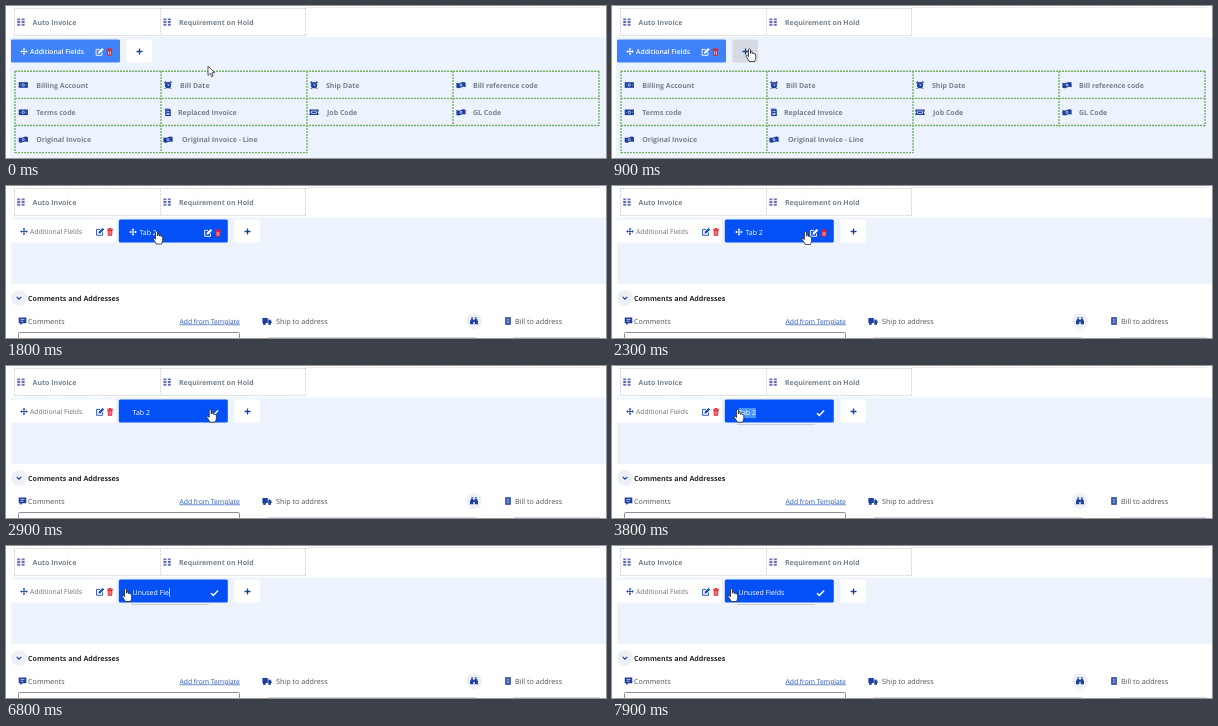
These frames come from a looping animation (600x152 px, 8 s). An HTML page:

```html
<!DOCTYPE html>
<html lang="en">
<head>
<meta charset="utf-8">
<title>Adding and renaming a tab</title>
<style>
  html, body { margin: 0; width: 100%; height: 100%; overflow: hidden; background: #fff; }
  svg { display: block; width: 600px; height: 152px; }
  text { font: 7px "Open Sans", "Noto Sans", sans-serif; white-space: pre; text-rendering: geometricPrecision; }
  .label { font-size: 7px; font-weight: 700; fill: #76818c; }
  .head { font-size: 7.1px; font-weight: 700; fill: #25282d; }
  .plain { font-size: 7.2px; fill: #4b5058; }
  .link { font-size: 6.75px; fill: #2457b5; text-decoration: underline; }
  .tab { fill: #fff; }
  .active { font-size: 6.75px; font-weight: 600; fill: #fff; }
  .idle { font-size: 6.8px; fill: #6b6f78; }
</style>
</head>
<body>
<svg id="stage" viewBox="0 0 600 152"></svg>
<script>
const NS = "http://www.w3.org/2000/svg";
const LOOP = 8000, STEP = 100;
const NAVY = "#1d3f9f", RED = "#e2222f", PANEL = "#edf3fd";
const stage = document.getElementById("stage");

function add(parent, tag, attrs = {}, content) {
  const el = document.createElementNS(NS, tag);
  for (const key in attrs) el.setAttribute(key, attrs[key]);
  if (content !== undefined) el.textContent = content;
  parent.appendChild(el);
  return el;
}
const group = (parent) => add(parent, "g");
const rect = (parent, x, y, width, height, fill, rx = 0) =>
  add(parent, "rect", { x, y, width, height, fill, rx });
const label = (parent, x, y, str, cls) => add(parent, "text", { x, y, class: cls }, str);
const line = (parent, d, stroke, dash = "none", width = 1) =>
  add(parent, "path", { d, stroke, fill: "none", "stroke-width": width, "stroke-dasharray": dash });
const show = (el, on) => el.setAttribute("visibility", on ? "inherit" : "hidden");
const place = (el, [x, y]) => el.setAttribute("transform", `translate(${x} ${y})`);

// Each icon is centred on 0,0: solid shape, strokes, pale details on top
const ICONS = {
  move: ["M0-3.8L1.4-2.1H-1.4ZM0 3.8L1.4 2.1H-1.4ZM-3.8 0L-2.1-1.4V1.4ZM3.8 0L2.1-1.4V1.4Z", "M-2.5 0H2.5M0-2.5V2.5"],
  edit: ["M-1.5 1.8L-1.1-.4 2.6-4 4.2-2.4.6 1.3Z", "M0-2.6H-3.4V3.3H2.5V.6"],
  trash: ["M-2.5-1.9H2.5L2.1 3.7H-2.1Z", "M-3-2.7H3M-1-3.5H1", "M-.9-.9V2.7M.9-.9V2.7"],
  list: ["M-3.6-3.6H-.6V-1.7H-3.6ZM.8-3.6H3.8V-1.7H.8ZM-3.6-.9H-.6V1H-3.6ZM.8-.9H3.8V1H.8ZM-3.6 1.8H-.6V3.7H-3.6ZM.8 1.8H3.8V3.7H.8Z"],
  bill: ["M-4.6-2.8H4.6V2.8H-4.6Z", "", "M0-1.2A1.2 1.2 0 0 1 0 1.2A1.2 1.2 0 0 1 0-1.2M-3.4 0H-2.8M2.8 0H3.4"],
  wave: ["M-4.6-2.2Q-2.2-1.2 0-2.4T4.6-2.6V2.3Q2.2 1.3 0 2.5T-4.6 2.7Z", "", "M0-1A1 1 0 0 1 0 1.1A1 1 0 0 1 0-1"],
  clock: ["M0-2.9A3.1 3.1 0 0 1 0 3.3A3.1 3.1 0 0 1 0-2.9", "M-3.6-2L-2-3.5M3.6-2L2-3.5M-2.4 2.8L-3.1 3.6M2.4 2.8L3.1 3.6", "M0-1.5V.4H1.4"],
  invoice: ["M-2.8-2.7H2.8V3.8H-2.8Z", "M-3.3-3.1H2.3", "M-1.5-.9H1.5M-1.2 1H1.2V2.2H-1.2Z"],
  ticket: ["M-4.6-2.8H4.6V-.9A.9.9 0 0 0 4.6.9V2.8H-4.6V.9A.9.9 0 0 0-4.6-.9Z", "", "M-2.5-1.2H2.5V1.2H-2.5Z"],
  plus: ["", "M-3 0H3M0-3V3"],
  check: ["", "M-3.5.2L-1.2 2.5 3.6-2.5"],
  chevron: ["", "M-2.3-1.2L0 1.2 2.3-1.2"],
  chat: ["M-3.8-3.4H3.8V2.2H0L-2.2 4V2.2H-3.8Z", "", "M-2-1.6H2M-2 .3H1"],
  truck: ["M-4.6-3H.8V2H-4.6ZM1.3-1.6H3L4.6.2V2H1.3ZM-2.6 1A1.5 1.5 0 0 1-2.6 4A1.5 1.5 0 0 1-2.6 1M2.6 1A1.5 1.5 0 0 1 2.6 4A1.5 1.5 0 0 1 2.6 1", "", "M-2.6 2.4V2.6M2.6 2.4V2.6"],
  binoculars: ["M-2.8-2.4H-.7V3.2H-4V.6ZM2.8-2.4H.7V3.2H4V.6ZM-2.7-3.7H-.9V-2.9H-2.7ZM.9-3.7H2.7V-2.9H.9ZM-.8-1H.8V1H-.8Z"],
  doc: ["M-2.8-3.8H2.8V3.8H-2.8Z", "", "M-1.5-1.8H1.5M-1.5 0H1.5M-1.5 1.8H1.5"],
};
function icon(parent, name, x, y, color, width = 1.1) {
  const [solid, strokes, detail] = ICONS[name];
  const g = group(parent);
  place(g, [x, y]);
  if (solid) add(g, "path", { d: solid, fill: color });
  if (strokes) line(g, strokes, color, "none", width);
  if (detail) line(g, detail, "#e9effb", "none", 0.7);
  return g;
}

function tabFrame(parent, x, width, fill) {
  return rect(parent, x, 33.4, width, 23, fill, 1.5);
}

function drawTop() {
  const g = group(stage);
  line(g, "M8 2.5H300M8 29.5H300M8.5 2V29M154.5 2V29M299.5 2V29", "#d0d3d6", "1.5 1");
  line(g, "M300 1.5H594", "#dfe1e4", "1.5 1");
  icon(g, "list", 14.8, 16, "#6672b4");
  label(g, 26.6, 18.5, "Auto Invoice", "label");
  icon(g, "list", 161, 16, "#6672b4");
  label(g, 173, 18.5, "Requirement on Hold", "label");
}

function drawFields() {
  const g = group(stage);
  rect(g, 4, 31, 596, 121, PANEL);
  tabFrame(g, 5, 109, "#3f82f7");
  icon(g, "move", 18, 45.5, "#fff", 0.9);
  label(g, 24, 48, "Additional Fields", "active");
  icon(g, "edit", 93.5, 46, "#fff", 0.9);
  icon(g, "trash", 103.5, 46, RED);
  const button = tabFrame(g, 120.5, 25.5, "#fff");
  icon(g, "plus", 133.5, 45.5, NAVY, 1.3);

  line(g, "M9 65.3H593M9 92.4H593M9 119.5H593M9 146.6H301M9 65V147M155 65V147M301 65V147M447 65V120M593 65V120",
    "#74b163", "2 1", 1.4);
  const rows = [
    [["bill", "Billing Account", 30.2], ["clock", "Bill Date", 174], ["clock", "Ship Date", 320], ["wave", "Bill reference code", 467]],
    [["bill", "Terms code", 30.2], ["invoice", "Replaced Invoice", 172], ["ticket", "Job Code", 321], ["wave", "GL Code", 467]],
    [["wave", "Original Invoice", 30.2], ["wave", "Original Invoice - Line", 176]],
  ];
  rows.forEach((cells, r) => cells.forEach(([name, str, x], c) => {
    const y = 79 + r * 27.3;
    icon(g, name, [17.3, 162, 308, 455][c], y, NAVY);
    label(g, x, y + 2.7, str, "label");
  }));
  return { g, button };
}

function drawForm() {
  const g = group(stage);
  rect(g, 5, 31.5, 595, 66.5, PANEL);
  tabFrame(g, 5, 105, "#fff");
  icon(g, "move", 18, 45.5, NAVY, 0.9);
  label(g, 24, 48, "Additional Fields", "idle");
  icon(g, "edit", 94, 46, "#1b48c4", 0.9);
  icon(g, "trash", 104, 46, RED);
  tabFrame(g, 228.5, 25.5, "#fff");
  icon(g, "plus", 241.5, 45.5, NAVY, 1.3);

  add(g, "circle", { cx: 13, cy: 112, r: 8, fill: "#edf0f7" });
  icon(g, "chevron", 13, 112, NAVY);
  label(g, 22, 115, "Comments and Addresses", "head");
  icon(g, "chat", 16.5, 135, NAVY);
  label(g, 22, 137.7, "Comments", "plain");
  label(g, 173.5, 137.5, "Add from Template", "link");
  icon(g, "truck", 261, 135, NAVY);
  label(g, 270, 137.7, "Ship to address", "plain");
  add(g, "circle", { cx: 468, cy: 135, r: 8, fill: "#edf0f7" });
  icon(g, "binoculars", 468, 135, NAVY);
  icon(g, "doc", 502, 135, NAVY);
  label(g, 509, 137.7, "Bill to address", "plain");
  add(g, "rect", { x: 12.5, y: 146.5, width: 221, height: 12, rx: 1, fill: "#fff", stroke: "#8d9095" });
  line(g, "M262 151.5H470M508 151.5H594", "#d3d6da");

  const underline = rect(g, 125, 58, 78, 1, "#c9d0dc");
  tabFrame(g, 112.8, 109, "#0450f7");
  const view = group(g);
  icon(view, "move", 127, 46, "#fff", 0.9);
  label(view, 133.5, 48.7, "Tab 2", "tab");
  icon(view, "edit", 202, 47, "#fff", 0.9);
  icon(view, "trash", 212, 47, RED);

  const edit = group(g);
  const marked = rect(edit, 126.6, 42, 0, 10, "#4b95ff");
  const input = label(edit, 126.6, 49.2, "Tab 2", "tab");
  const caret = rect(edit, 0, 42, 0.7, 9, "#e6eeff");
  icon(edit, "check", 208.5, 47, "#fff", 1.5);
  return { g, underline, view, edit, marked, input, caret };
}

function drawPointers() {
  const make = (d, fill, stroke, width) => add(stage, "path",
    { d, fill, stroke, "stroke-width": width, "stroke-linejoin": "round" });
  return {
    arrow: make("M0 0V9.4L2.2 7.4 3.7 10.7 5.2 10 3.7 6.8H6.6Z", "#fff", "#333", 0.8),
    hand: make("M-1 1Q0-.5 1 1V4.8Q2-.0 2.8 5Q4 4 4.5 5.4Q6 4.8 6.2 6.4V9.3Q6 11 5 13H-.2Q-1.2 11-3.4 8Q-3.6 6.6-2.3 7L-1 8.2Z",
      "#fff", "#222", 0.8),
    beam: make("M-1.8-4.5H1.8M0-4.5V4.5M-1.8 4.5H1.8", "none", "#dbe6ff", 0.8),
  };
}

// time, x, y of the pointer tip
const PATH = [
  [0, 202, 60], [300, 187, 72], [600, 153, 62], [900, 137.5, 42.5],
  [1500, 137.5, 42.5], [1800, 150.5, 45], [2400, 202, 45.5], [2500, 202, 45.5],
  [2900, 204.2, 43.2], [3400, 150, 46], [3900, 119.5, 42.5], [8000, 119.5, 42.5],
];
function pointerAt(t) {
  const i = Math.max(1, PATH.findIndex((p) => p[0] > t));
  const [t0, x0, y0] = PATH[i - 1], [t1, x1, y1] = PATH[i];
  const k = (t - t0) / (t1 - t0);
  return [x0 + (x1 - x0) * k, y0 + (y1 - y0) * k];
}

// time at which each number of letters is reached
const NAME = "Unused Fields";
const KEYS = [4800, 5000, 5200, 5400, 5600, 5800, 6300, 6600, 6700, 6800, 7000, 7300, 7800];

drawTop();
const fields = drawFields();
const form = drawForm();
const pointers = drawPointers();

function render(t) {
  const added = t >= 1200, editing = t >= 2600, typing = t >= KEYS[0];
  const spot = pointerAt(t);

  show(fields.g, !added);
  fields.button.setAttribute("fill", t >= 800 ? "#d5dae3" : "#fff");
  show(form.g, added);
  show(form.view, added && !editing);
  show(form.edit, added && editing);
  show(form.underline, t >= 3500);

  const str = typing ? NAME.slice(0, KEYS.filter((k) => k <= t).length) : "Tab 2";
  if (form.input.textContent !== str) form.input.textContent = str;
  const left = 126.6, end = left + form.input.getComputedTextLength();
  form.caret.setAttribute("x", end + 0.3);
  show(form.caret, typing && t < 7900);

  const start = Math.max(left, spot[0]);
  form.marked.setAttribute("x", start);
  form.marked.setAttribute("width", Math.max(0, end - start));
  show(form.marked, t >= 3500 && !typing);

  const kind = t < 800 ? "arrow" : t >= 3000 && t < 3800 ? "beam" : "hand";
  for (const name in pointers) show(pointers[name], name === kind);
  place(pointers[kind], spot);
}

const begin = performance.now();
function tick() {
  const t = (performance.now() - begin) % LOOP;
  render(Math.floor(t / STEP) * STEP);
  requestAnimationFrame(tick);
}
tick();
</script>
</body>
</html>
```
